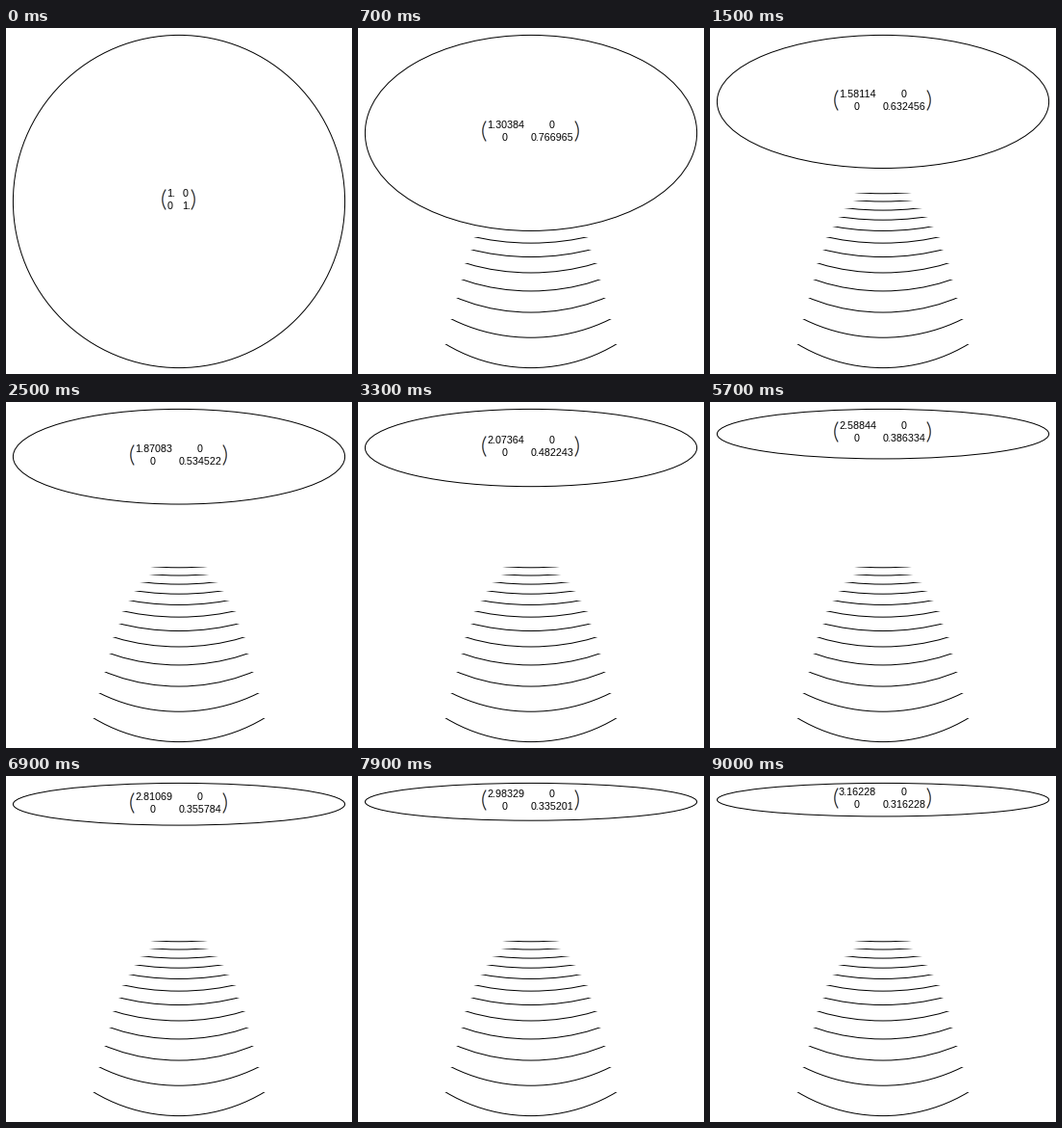
These frames come from a looping animation (360 by 359 pixels, 9100 ms). A matplotlib script:

```python
import math

import numpy as np
import matplotlib.pyplot as plt
from matplotlib.animation import FuncAnimation
from matplotlib.patches import Ellipse, Rectangle

W, H, DPI = 360, 359, 100
FRAMES, STEP_MS = 91, 100
DIAM = H / 1.04              # circle inside a 2 % margin
MARGIN = (H - DIAM) / 2
CX = W / 2
TRAILS = 12                  # arcs that stay behind below the shrinking picture
DIGIT, DOT, GAP, ROW = 6, 3, 7, 13
PX = 72 / DPI                # points per pixel

fig = plt.figure(figsize=(W / DPI, H / DPI), dpi=DPI, facecolor="white")
ax = fig.add_axes([0, 0, 1, 1])
ax.set_xlim(0, W)
ax.set_ylim(H, 0)
ax.axis("off")


def squeeze(i):
    return 1 + 0.1 * i


def middle(i):
    return MARGIN + 0.5 + DIAM / squeeze(i) / 2


def picture_height(i):
    return math.ceil(2 * MARGIN + DIAM / squeeze(i))


def ellipse(i):
    shape = Ellipse((CX, middle(i)), DIAM, DIAM / squeeze(i),
                    fill=False, ec="black", lw=PX)
    return ax.add_patch(shape)


def number(v):
    s = f"{v:.6g}"
    return s if "." in s else s + "."


def width(s):
    return sum(DOT if c == "." else DIGIT for c in s)


trails = []
for k in range(TRAILS):
    arc = ellipse(k)
    top = picture_height(k + 1)
    arc.set_clip_path(Rectangle((0, top), W, H - top, transform=ax.transData))
    trails.append(arc)

outline = ellipse(0)
cells = [ax.text(0, 0, "", family="Liberation Sans", size=10.8 * PX,
                 ha="center", va="baseline") for _ in range(4)]

# Brackets carry the warm and cool fringes of subpixel text.
FRINGES = [(-0.45, "#f0b060"), (0.45, "#70a8f0"), (0, "#202028")]
brackets = [(side, dx, ax.plot([], [], color=c, lw=0.9 * PX)[0])
            for side in (-1, 1) for dx, c in FRINGES]
bend = np.linspace(-1, 1, 25)


def draw(i):
    s = squeeze(i)
    mid = middle(i)
    outline.set_center((CX, mid))
    outline.height = DIAM / s
    for k, arc in enumerate(trails):
        arc.set_visible(k < i)

    a, d = number(math.sqrt(s)), number(1 / math.sqrt(s))
    wa, wd = width(a), width(d)
    half = (wa + GAP + wd) / 2
    left, right = CX - 0.5 - half, CX - 0.5 + half
    col1, col2 = left + wa / 2, right - wd / 2
    base = round(mid - 4.7)
    places = [(a, col1, 0), ("0", col2 - 0.5, 0),
              ("0", col1 - 0.5, ROW), (d, col2, ROW)]
    for cell, (txt, x, dy) in zip(cells, places):
        cell.set_text(txt)
        cell.set_position((x, base + dy))

    for side, dx, line in brackets:
        edge = left if side < 0 else right
        line.set_data(edge + side * (4.2 - 3 * bend ** 2) + dx,
                      base + 3 + 10 * bend)
    return [outline, *trails, *cells, *(b[2] for b in brackets)]


anim = FuncAnimation(fig, draw, frames=FRAMES, interval=STEP_MS,
                     repeat=True, repeat_delay=0, blit=False)
plt.show()
```
